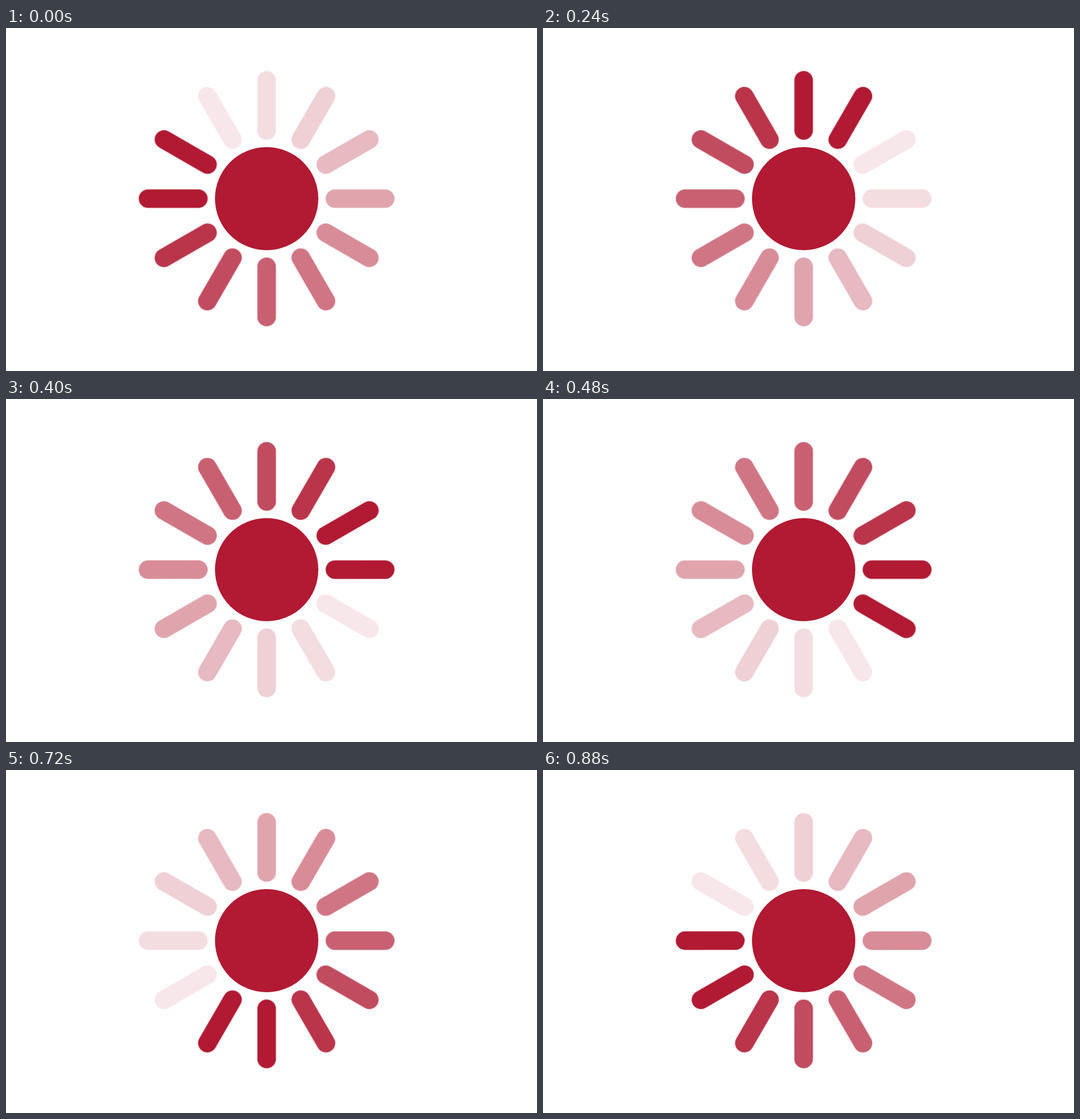
Write an HTML page that moves like this. It is 930 px wide and 602 px high and loops after 0.96 s.

```html
<!DOCTYPE html>
<html lang="en">
<head>
<meta charset="utf-8">
<title>Sun spinner</title>
<style>
  html, body { margin: 0; width: 100%; height: 100%; overflow: hidden; background: #fff; }
  svg { display: block; width: 930px; height: 602px; }
  #rays {
    stroke: #b11a32;
    stroke-width: 32.6;
    stroke-linecap: round;
    transform-origin: 0 0;
    animation: spin 960ms steps(12, end) infinite;
  }
  @keyframes spin { to { transform: rotate(360deg); } }
</style>
</head>
<body>
<svg viewBox="0 0 930 602">
  <g transform="translate(456.5 299.5)">
    <circle r="90.5" fill="#b11a32"/>
    <g id="rays"></g>
  </g>
</svg>
<script>
  // Opacity of each ray, from the leading one back to the end of the tail
  const fade = [1, 1, .88, .78, .69, .6, .5, .395, .3, .205, .145, .1];
  const rays = document.getElementById('rays');

  fade.forEach((opacity, i) => {
    const ray = document.createElementNS('http://www.w3.org/2000/svg', 'line');
    const attrs = { y1: -119.6, y2: -207.7, opacity, transform: `rotate(${300 - 30 * i})` };
    for (const name in attrs) ray.setAttribute(name, attrs[name]);
    rays.append(ray);
  });
</script>
</body>
</html>
```
